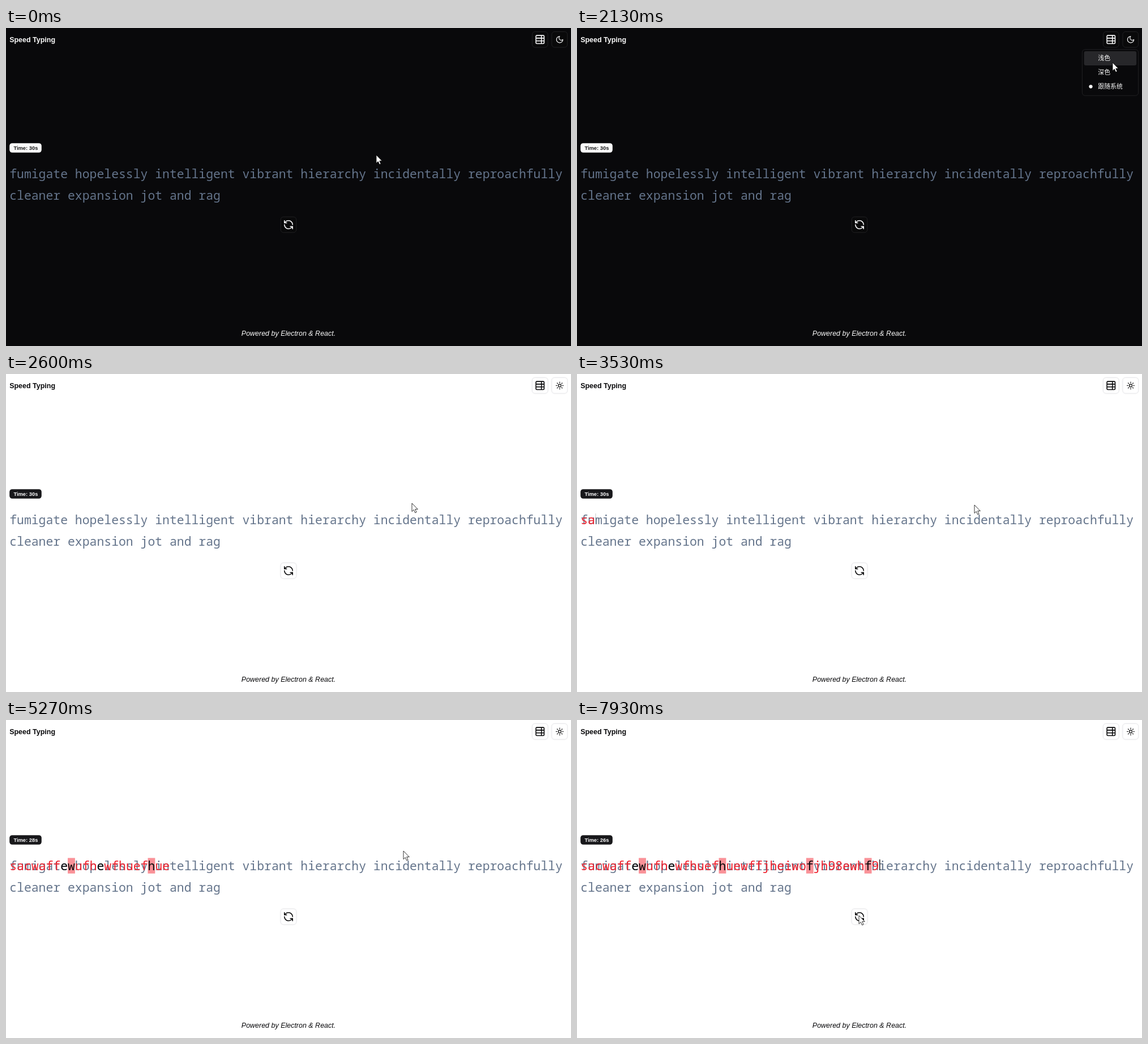
These frames come from a looping animation (998 px wide and 561 px high, 8000 ms). An HTML page:

```html
<!DOCTYPE html>
<html lang="zh-CN">
<head>
<meta charset="utf-8">
<title>Speed Typing</title>
<style>
  html, body { margin: 0; width: 100%; height: 100%; overflow: hidden; }
  svg { display: block; width: 998px; height: 561px; font-family: "Liberation Sans", Arial, sans-serif;
    --bg: #fff; --fg: #09090b; --line: #e4e4e7; --accent: #f4f4f5; --badge: #18181b; }
  svg.dark { --bg: #09090b; --fg: #fafafa; --line: #27272a; --accent: #27272a; --badge: #fafafa; }
  .page { fill: var(--bg); }
  .fg { fill: var(--fg); }
  .title { font-size: 12.47px; font-weight: bold; }
  .foot { font-size: 12.47px; font-style: italic; text-anchor: middle; }
  .time { font-size: 9.35px; font-weight: bold; }
  .mono { font: 21.43px "Noto Sans Mono", monospace; white-space: pre; }
  .words { fill: #64748b; }
  .menu { font: 10.92px "Noto Sans CJK SC", "Noto Sans CJK", sans-serif; }
  .panel { fill: var(--bg); stroke: var(--line); stroke-width: .8; }
  svg:not(.dark) .panel { filter: drop-shadow(0 1.5px 2px rgba(0,0,0,.13)); }
  .btn { stroke: var(--line); stroke-width: .8; }
  svg:not(.dark) .btn { filter: drop-shadow(0 .8px .8px rgba(0,0,0,.08)); }
  .icon { fill: none; stroke-width: 2; stroke-linecap: round; stroke-linejoin: round; }
</style>
</head>
<body>
<svg id="stage" viewBox="0 0 998 561">
  <rect class="page" width="998" height="561"/>
  <text class="fg title" x="6.2" y="24.5">Speed Typing</text>
  <g id="buttons">
    <rect class="btn" x="929.5" y="6.5" width="27.6" height="27.6" rx="5"/>
    <rect class="btn" x="964" y="6.5" width="27.6" height="27.6" rx="5"/>
    <rect class="btn" x="485.2" y="333.2" width="27.6" height="27.6" rx="5"/>
  </g>
  <g id="icons" class="icon">
    <path transform="translate(943.3 20.3) scale(.8) translate(-12 -12)"
      d="M15 3v18M5 3h14a2 2 0 0 1 2 2v14a2 2 0 0 1-2 2H5a2 2 0 0 1-2-2V5a2 2 0 0 1 2-2zM21 9H3M21 15H3"/>
    <path transform="translate(499 347) scale(.8) translate(-12 -12)"
      d="M21 12a9 9 0 0 0-9-9 9.75 9.75 0 0 0-6.74 2.74L3 8M3 3v5h5M3 12a9 9 0 0 0 9 9 9.75 9.75 0 0 0 6.74-2.74L21 16M16 16h5v5"/>
    <path id="moon" d="M12 3a6 6 0 0 0 9 9 9 9 0 1 1-9-9Z"/>
    <path id="sun" d="M16 12a4 4 0 1 1-8 0 4 4 0 0 1 8 0zM12 2v2M12 20v2M4.93 4.93l1.41 1.41M17.66 17.66l1.41 1.41M2 12h2M20 12h2M6.34 17.66l-1.41 1.41M19.07 4.93l-1.41 1.41"/>
  </g>
  <rect x="6.2" y="203.2" width="56.6" height="16.6" rx="4.8" fill="var(--badge)"/>
  <text id="time" class="time" x="13.4" y="214.8"></text>
  <text class="mono words" x="6.2" y="264.9">fumigate hopelessly intelligent vibrant hierarchy incidentally reproachfully</text>
  <text class="mono words" x="6.2" y="302.9">cleaner expansion jot and rag</text>
  <g id="marks" fill="#fa9298"></g>
  <text id="typed" class="mono" x="6.2" y="264.9"></text>
  <rect id="caret" class="fg" y="246" width="1.4" height="19"/>
  <text class="fg foot" x="499" y="543.2">Powered by Electron &amp; React.</text>
  <g id="menu" class="menu">
    <rect class="panel" x="892.4" y="37.9" width="99.2" height="81.3" rx="5"/>
    <rect x="895.6" y="41" width="92.6" height="25" rx="3.2" fill="var(--accent)"/>
    <circle id="dot" class="fg" cx="907.5" r="3.1"/>
    <text class="fg" x="920.3" y="57.3">浅色</text>
    <text class="fg" x="920.3" y="82.2">深色</text>
    <text class="fg" x="920.3" y="107.2">跟随系统</text>
  </g>
  <path id="mouse" d="M0 0V14.6L3.3 11.5 5.7 16.8 8.1 15.7 5.8 10.6H10.3Z" fill="#fff" stroke="#000" stroke-width=".8" stroke-linejoin="round"/>
</svg>
<script>
  const $ = id => document.getElementById(id);
  const svgEl = (tag, attrs, parent) => {
    const el = document.createElementNS("http://www.w3.org/2000/svg", tag);
    for (const k in attrs) el.setAttribute(k, attrs[k]);
    return parent.appendChild(el);
  };
  const clamp = v => Math.max(0, Math.min(1, v));
  const linear = p => p;
  const smooth = p => p * p * (3 - 2 * p);

  const LOOP = 8000, TICK = 1000 / 15;
  const LEFT = 6.2, ADV = 12.858;
  const THEME = 33, START = 49;
  const words = "fumigate hopelessly intelligent vibrant hierarchy";
  const keys = "sacwaffewufhewfhuefhuewffjheiwofjh98ewhf9";

  // [tick, x, y]
  const path = [[0, 654, 224], [12, 985, 21], [14, 982, 22], [19, 950, 78], [25, 947, 68],
    [30, 946, 61], [33, 946, 61], [39, 717, 228], [45, 702, 231], [106, 702, 231], [117, 498, 345]];
  // [tick, characters typed]
  const typing = [[48, 0], [49, 1], [51, 2], [54, 2], [65, 10], [78, 20], [79, 22], [90, 31], [92, 31], [104, 41]];
  // [tick, start of a caret blink in ms]
  const blinks = [[0, -20], [THEME, 2190], [70, 4562], [92, 6450]];
  const BLINK = 730;

  function at(table, k, ease) {
    let i = 0;
    while (i < table.length - 1 && table[i + 1][0] <= k) i++;
    const a = table[i], b = table[i + 1];
    if (!b) return a.slice(1);
    const p = ease((k - a[0]) / (b[0] - a[0]));
    return a.slice(1).map((v, j) => v + (b[j + 1] - v) * p);
  }

  const chars = [...keys].map((c, i) => {
    const span = svgEl("tspan", {}, $("typed"));
    span.textContent = c;
    const gap = words[i] === " ";
    const mark = gap && svgEl("rect", { x: LEFT + i * ADV, y: 243.4, width: ADV, height: 27.4 }, $("marks"));
    return { span, mark, fill: gap || words[i] === c ? "#09090b" : "#f0222e" };
  });

  const grey = (a, b, p) => {
    const v = Math.round(a + (b - a) * p);
    return `rgb(${v},${v},${Math.min(255, v + 1)})`;
  };
  const spin = (el, angle, size) => el.setAttribute("transform",
    `translate(978 20.4) rotate(${angle}) scale(${.624 * size}) translate(-12 -12)`);

  function draw(ms) {
    const k = Math.floor((ms + 4) / TICK) % 120;
    const light = k >= THEME;
    const fade = clamp((k - THEME) / 3);
    $("stage").classList.toggle("dark", !light);

    $("buttons").setAttribute("fill", grey(9, 255, fade));
    $("icons").setAttribute("stroke", grey(250, 9, fade));
    spin($("moon"), 90 * fade, 1 - fade);
    spin($("sun"), 90 * fade - 90, fade);

    $("time").textContent = `Time: ${30 - Math.max(0, Math.floor((k - START) / 15))}s`;
    $("time").setAttribute("fill", grey(24, 250, fade));

    const show = light ? 1 - fade : clamp((k - 14) / 2);
    const zoom = .95 + .05 * show;
    $("menu").setAttribute("opacity", show);
    $("menu").setAttribute("transform", `translate(992 38) scale(${zoom}) translate(-992 -38)`);
    $("dot").setAttribute("cy", light ? 53.5 : 103.3);

    const n = Math.floor(at(typing, k, linear)[0] + 1e-6);
    chars.forEach((c, i) => {
      c.span.setAttribute("fill", i < n ? c.fill : "none");
      if (c.mark) c.mark.setAttribute("opacity", i < n ? 1 : 0);
    });

    const since = blinks.filter(b => b[0] <= k).pop()[1];
    const phase = ((k * TICK - since) % BLINK) / BLINK;
    $("caret").setAttribute("x", LEFT + .2 + n * (ADV + .012));
    $("caret").setAttribute("opacity", 1 - phase);

    $("mouse").setAttribute("transform", `translate(${at(path, k, smooth)})`);
  }

  const t0 = performance.now();
  function loop() {
    draw((performance.now() - t0) % LOOP);
    requestAnimationFrame(loop);
  }
  draw(0);
  requestAnimationFrame(loop);
</script>
</body>
</html>
```
